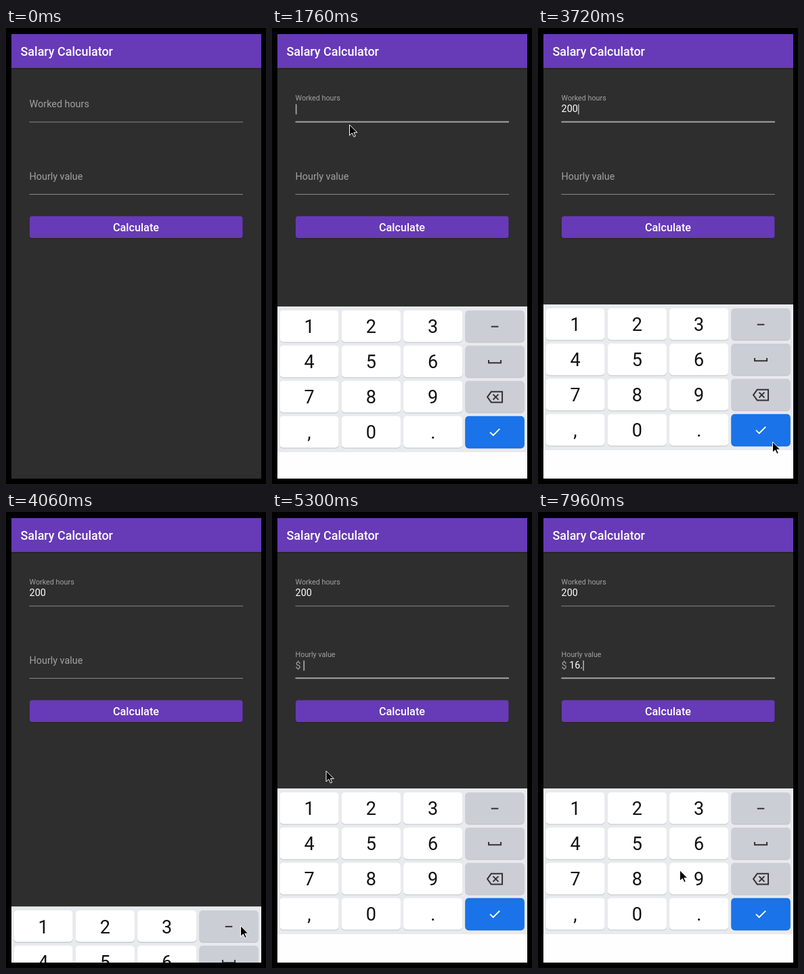
An HTML page for the animation above (8000 ms loop, 384 by 673 pixels).

```html
<!DOCTYPE html>
<html lang="en">
<head>
<meta charset="utf-8">
<title>Salary Calculator</title>
<style>
html, body { margin: 0; width: 100%; height: 100%; overflow: hidden; background: #000; }
svg { display: block; width: 100%; height: 100%; }
text { font-family: Roboto, Arial, sans-serif; white-space: pre; }
.bold { font-weight: 500; fill: #fff; }
.label { fill: #a2a2a2; font-size: 14.35px; }
.value { fill: #fff; font-size: 14.35px; }
.key { fill: #111; font-size: 27px; text-anchor: middle; }
.icon { fill: none; stroke: #333; stroke-width: 2; }
</style>
</head>
<body>
<svg viewBox="0 0 384 673">
  <defs>
    <clipPath id="screen"><rect x="8" y="9" width="369" height="656"/></clipPath>
    <linearGradient id="shade" x2="0" y2="1">
      <stop offset="0" stop-color="#000" stop-opacity=".3"/>
      <stop offset="1" stop-color="#000" stop-opacity="0"/>
    </linearGradient>
  </defs>
  <rect width="384" height="673" fill="#000"/>
  <g clip-path="url(#screen)">
    <rect x="8" y="9" width="369" height="656" fill="#2e2e2e"/>
    <rect x="8" y="59" width="369" height="3" fill="url(#shade)"/>
    <rect x="8" y="9" width="369" height="50" fill="#673ab7"/>
    <text class="bold" x="21.5" y="40.6" font-size="17.95">Salary Calculator</text>
    <g id="fields"></g>
    <rect x="35" y="278.5" width="314.5" height="32.3" rx="3.5" fill="#000" opacity=".3"/>
    <rect x="35" y="277.7" width="314.5" height="32.3" rx="3.5" fill="#673ab7"/>
    <text class="bold" x="192" y="299.8" font-size="16.2" text-anchor="middle">Calculate</text>
    <g id="keyboard"></g>
  </g>
  <g id="pointer">
    <path d="M.5 .8V16.6L4.3 13L6.9 18.6L9.3 17.5L6.8 12.2H11.8Z" fill="#000" stroke="#fff" stroke-width="1"/>
  </g>
  <circle id="tap" r="12" fill="#ff0" opacity=".55"/>
</svg>
<script>
const LOOP = 8000;
const NS = "http://www.w3.org/2000/svg";
const byId = id => document.getElementById(id);

function add(parent, tag, attrs, content) {
  const el = document.createElementNS(NS, tag);
  for (const name in attrs) el.setAttribute(name, attrs[name]);
  if (content) el.textContent = content;
  parent.appendChild(el);
  return el;
}

const clamp = x => Math.min(1, Math.max(0, x));
const progress = (t, start, length) => clamp((t - start) / length);
const easeOut = x => 1 - (1 - x) ** 3;
const smooth = x => x * x * (3 - 2 * x);
const mix = (a, b, k) => a + (b - a) * k;
const show = (el, on) => el.setAttribute("visibility", on ? "visible" : "hidden");
const place = (el, x, y) => el.setAttribute("transform", `translate(${x} ${y})`);

// Form fields: edits are [time, text after it]
const fields = [
  { label: "Worked hours", y: 0, prefix: "", textX: 34.6, focus: 1490, blur: 3900,
    edits: [[2450, "2"], [3250, "20"], [3480, "200"]] },
  { label: "Hourly value", y: 106.7, prefix: "$", textX: 46.2, focus: 4957, blur: LOOP,
    edits: [[5840, "1"], [6500, "16"], [7470, "16."]] }
];

for (const f of fields) {
  const g = add(byId("fields"), "g", { transform: `translate(0 ${f.y})` });
  f.line = add(g, "rect", { x: 34.5, width: 315.5 });
  f.name = add(g, "text", { class: "label", x: 34.6 }, f.label);
  f.sign = add(g, "text", { class: "label", x: 34.6, y: 124.4 }, f.prefix);
  f.value = add(g, "text", { class: "value", x: f.textX, y: 124.4 });
  f.caret = add(g, "rect", { y: 112.5, width: 1.7, height: 15, fill: "#a8a8a8" });
}

const DIGIT = 14.35 * 0.5615, DOT = 14.35 * 0.263;
const textWidth = s => [...s].reduce((w, c) => w + (c === "." ? DOT : DIGIT), 0);

function drawField(f, t) {
  const focused = t >= f.focus && t < f.blur;
  const lift = easeOut(progress(t, f.focus, 200));
  f.name.setAttribute("y", mix(117.2, 107, lift));
  f.name.style.fontSize = mix(14.35, 10.76, lift) + "px";
  f.sign.setAttribute("opacity", lift);
  f.line.setAttribute("y", focused ? 137.6 : 138.3);
  f.line.setAttribute("height", focused ? 1.9 : 1);
  f.line.setAttribute("fill", focused ? "#aaa" : "#888");

  let text = "", since = f.focus;
  for (const [time, after] of f.edits) if (t >= time) [since, text] = [time, after];
  f.value.textContent = text;
  f.caret.setAttribute("x", f.textX + textWidth(text) + 0.2);
  show(f.caret, focused && (t - since) % 1000 < 500);
}

// Keyboard, drawn relative to its top edge
const keyboard = byId("keyboard");
const KEY_ROWS = ["123-", "456_", "789<", ",0.v"];
const KEY_TOP = 408, KEY_TRAVEL = 257;
const keys = {};

add(keyboard, "rect", { x: 8, width: 369, height: 257, fill: "#e8eaed" });
add(keyboard, "rect", { x: 8, y: 215, width: 369, height: 45, fill: "#fefefe" });

const icons = {
  "-": g => add(g, "path", { class: "icon", d: "M-5.3 .3H5.3" }),
  "_": g => add(g, "path", { class: "icon", d: "M-9 -2.5V1.8H9V-2.5" }),
  "<": g => add(g, "path", { class: "icon", "stroke-width": 1.8,
    d: "M-11 .2L-5.3 -7.6H11V8H-5.3ZM-2.6 -3.8L5.4 4.2M5.4 -3.8L-2.6 4.2" }),
  "v": g => add(g, "path", { class: "icon", style: "stroke:#fff", d: "M-7 .2L-2.4 4.8L7.2 -4.8" })
};

KEY_ROWS.forEach((row, r) => [...row].forEach((c, i) => {
  const g = add(keyboard, "g", { transform: `translate(${55 + i * 91.35} ${29.4 + r * 52})` });
  const fill = c === "v" ? "#1a73e8" : i === 3 ? "#cbced5" : "#fff";
  const box = { x: -43.6, width: 87.2, height: 46.6, rx: 5 };
  add(g, "rect", { ...box, y: -22.5, fill: c === "v" ? "#1a62c4" : "#bfc2c7" });
  keys[c] = { fill, cap: add(g, "rect", { ...box, y: -23.6, fill }) };
  if (icons[c]) icons[c](g);
  else add(g, "text", { class: "key", y: 10 }, c);
}));

function keyboardShown(t) {
  if (t < 3912) return easeOut(progress(t, 1529, 300));
  if (t < 4900) return 1 - smooth(progress(t, 3912, 240));
  return easeOut(progress(t, 4995, 300));
}

// Taps: [start, end, key]
const taps = [
  [1270, 1470], [2310, 2500, "2"], [3120, 3270, "0"], [3340, 3490, "0"],
  [3860, 3960, "v"], [4690, 4890], [5560, 5790, "1"], [6320, 6520, "6"], [7240, 7440, "."]
];

// Pointer path: [time, x, y]
const path = [
  [330, 314, 604], [1090, 123, 138], [1230, 114, 142], [1910, 114, 142],
  [2170, 153, 445], [2500, 153, 445], [2720, 152, 543], [2880, 152, 543],
  [3050, 153, 586], [3490, 153, 586], [3720, 346, 610], [4080, 346, 610],
  [4610, 136, 205], [5000, 136, 205], [5440, 62, 436], [5800, 62, 436],
  [6260, 208, 497], [6330, 211, 492], [6520, 211, 492], [6820, 279, 578],
  [7100, 243, 594], [7480, 243, 594], [7960, 209, 528]
];

function pointerAt(t) {
  const next = path.findIndex(p => p[0] > t);
  if (next < 0) return path[path.length - 1].slice(1);
  if (next === 0) return path[0].slice(1);
  const [a, b] = [path[next - 1], path[next]];
  const k = smooth(progress(t, a[0], b[0] - a[0]));
  return [mix(a[1], b[1], k), mix(a[2], b[2], k)];
}

function draw(t) {
  fields.forEach(f => drawField(f, t));

  const shown = keyboardShown(t);
  show(keyboard, shown > 0);
  place(keyboard, 0, KEY_TOP + KEY_TRAVEL * (1 - shown));

  const tap = taps.find(([start, end]) => t >= start && t < end);
  for (const c in keys) {
    const pressed = tap && tap[2] === c;
    keys[c].cap.setAttribute("fill", !pressed ? keys[c].fill : c === "v" ? "#1967d2" : "#e4e6e6");
  }

  const [x, y] = pointerAt(t);
  show(byId("pointer"), t >= path[0][0]);
  place(byId("pointer"), x, y);
  show(byId("tap"), !!tap);
  place(byId("tap"), x - 0.5, y + 0.8);
}

const began = performance.now();
function frame() {
  draw((performance.now() - began) % LOOP);
  requestAnimationFrame(frame);
}
frame();
</script>
</body>
</html>
```
